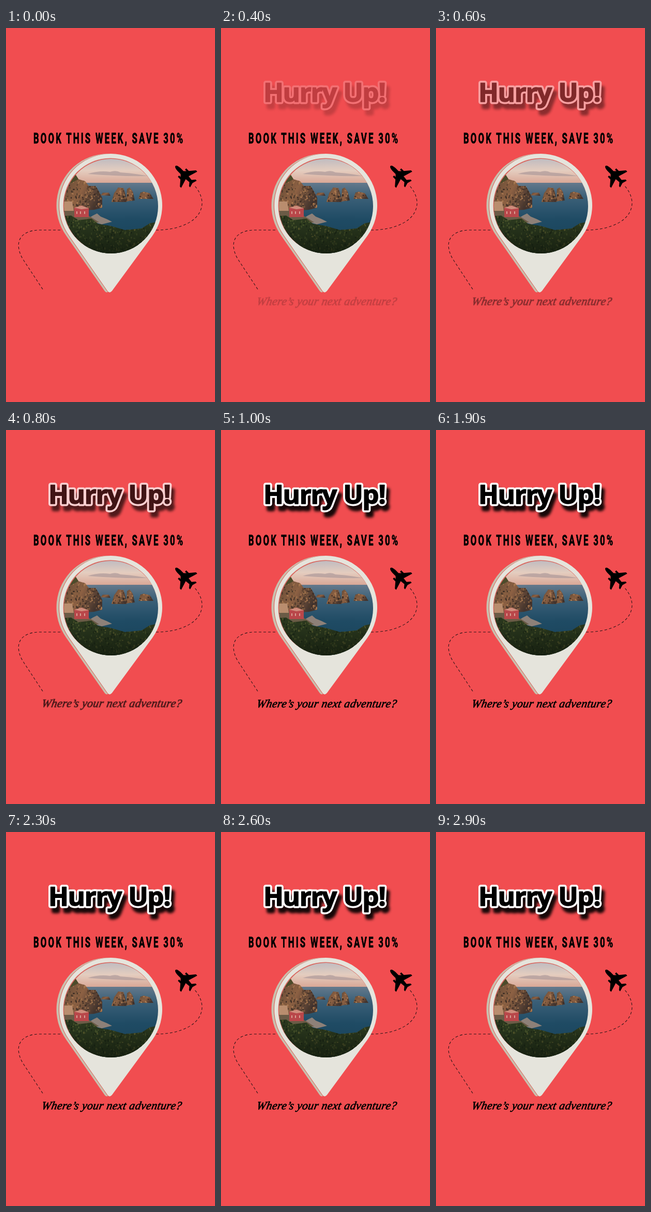
Recreate the animation shown at these times as an HTML page. Size 404 by 720 pixels, loop 3000 ms.

```html
<!DOCTYPE html>
<html lang="en">
<head>
<meta charset="utf-8">
<title>Book this week</title>
<style>
  html, body { margin: 0; width: 100%; height: 100%; overflow: hidden; background: #f14d50; }
  svg { display: block; width: 100vw; height: 100vh; }
  .shout { font: 700 51px "Open Sans", "Noto Sans", sans-serif; letter-spacing: -1.4px; word-spacing: 1.5px;
    stroke-linejoin: round; filter: drop-shadow(6px 10px 2.5px rgba(0, 0, 0, .9)); }
  .offer { font: 700 28px Roboto, sans-serif; letter-spacing: 5.2px; word-spacing: -1px;
    stroke: #000; stroke-width: .8px; }
  .script { font: italic 22px "Liberation Serif", serif; letter-spacing: .35px;
    stroke: #000; stroke-width: .7px; }
  .route { fill: none; stroke: #2a1518; stroke-width: 1.1px; stroke-dasharray: 5 4; }
</style>
</head>
<body>
<svg viewBox="0 0 404 720">
  <defs>
    <linearGradient id="sky" x2="0" y2="1">
      <stop stop-color="#bdbac0"/>
      <stop offset=".5" stop-color="#e4cdbf"/>
      <stop offset="1" stop-color="#d9a695"/>
    </linearGradient>
    <linearGradient id="sea" x2="0" y2="1">
      <stop stop-color="#64798c"/>
      <stop offset=".2" stop-color="#3b6078"/>
      <stop offset=".5" stop-color="#1f4b64"/>
      <stop offset="1" stop-color="#173f55"/>
    </linearGradient>
    <linearGradient id="rock" x2="1" y2=".5">
      <stop stop-color="#5d4532"/>
      <stop offset=".55" stop-color="#8d6143"/>
      <stop offset="1" stop-color="#43342e"/>
    </linearGradient>
    <linearGradient id="shade" x2="0" y2="1">
      <stop stop-color="#10180c" stop-opacity="0"/>
      <stop offset="1" stop-color="#10180c" stop-opacity=".8"/>
    </linearGradient>
    <clipPath id="lens"><circle cx="203" cy="343" r="91"/></clipPath>
    <path id="pin" d="M196 506L122 400A99.5 99.5 0 1 1 283 400L205 506Q200 512 196 506Z"/>
    <g id="rocks">
      <path d="M110 282L133 280L140 291L153 295L160 304L173 304L180 315L186 327V346L170 350L110 354Z"/>
      <path d="M183 322L187 317L199 317L202 323Z"/>
      <path d="M204 335L209 318L217 307L227 308L231 320L233 335Z"/>
      <path d="M232 334L234 310L239 307L245 315L249 332Z"/>
      <path d="M256 329L260 317L266 315L278 318L285 329Z"/>
    </g>
    <path id="hill" d="M110 362L126 361L140 370L165 367L178 377L202 381L230 389L262 386L278 376L298 372V438H110Z"/>
    <clipPath id="inRocks">
      <path d="M110 282L133 280L140 291L153 295L160 304L173 304L180 315L186 327V346L110 354Z"/>
      <path d="M204 335L209 318L217 307L227 308L233 320L239 307L245 315L249 332Z"/>
      <path d="M256 329L260 317L266 315L278 318L285 329Z"/>
    </clipPath>
    <clipPath id="inHill"><use href="#hill"/></clipPath>
  </defs>

  <rect width="404" height="720" fill="#f14d50"/>
  <path class="route" d="M71 503L32 444C14 412 28 389 66 389H105"/>
  <path class="route" d="M290 389C335 389 379 372 379 336C378 322 372 312 364 303"/>

  <use href="#pin" x="-5.5" fill="#c9c0ae"/>
  <use href="#pin" x="-1" fill="#d9564f"/>
  <use href="#pin" fill="#e5e4dc"/>
  <circle cx="202" cy="342" r="91.5" fill="#d9675f"/>

  <g clip-path="url(#lens)">
    <rect x="110" y="250" width="188" height="49" fill="url(#sky)"/>
    <path d="M158 281Q180 274 201 277Q213 273 221 278Q250 280 275 285Q220 286 158 281Z" fill="#a99798" opacity=".65"/>
    <rect x="110" y="298" width="188" height="140" fill="url(#sea)"/>
    <use href="#rocks" fill="url(#rock)"/>
    <g id="crags" clip-path="url(#inRocks)"></g>
    <path d="M110 282L133 280L140 291L129 297L110 304Z" fill="#4c4b2a"/>
    <path d="M155 369L168 361L176 357L183 363L195 368L205 373L185 378Z" fill="#8d8078"/>
    <path d="M110 352L131 349L161 362L180 374L110 380Z" fill="#6b5b46"/>
    <path d="M112 334H128L131 352H112Z" fill="#b98d6e"/>
    <path d="M132 346L146 342L160 347V364H132Z" fill="#b9474a"/>
    <path d="M132 346L146 342L160 347L146 349Z" fill="#cf8d7c"/>
    <path d="M137 353v5M144 353v5M152 353v5" stroke="#e3bfae" stroke-width="1.5"/>
    <use href="#hill" fill="#29361d"/>
    <g id="bushes" clip-path="url(#inHill)"></g>
    <rect x="110" y="375" width="188" height="62" fill="url(#shade)" clip-path="url(#inHill)"/>
  </g>

  <path transform="translate(346 284) rotate(-45)" d="M0-26C2.5-26 4-21 4-16V-8L8-4V-8H11.5V-1L22 8V11.5L4 6L3 15L9 20V23L0 20.5L-9 23V20L-3 15L-4 6L-22 11.5V8L-11.5-1V-8H-8V-4L-4-8V-16C-4-21-2.5-26 0-26Z"/>

  <text class="offer" transform="translate(53 222) scale(.6 1)">BOOK THIS WEEK, SAVE 30%</text>
  <g id="reveal">
    <g class="shout">
      <text id="shout" x="82" y="142" stroke="#fff" stroke-width="9">Hurry Up!</text>
      <use href="#shout" id="face"/>
    </g>
    <text class="script" transform="translate(68 534) skewX(-10)">Where’s your next adventure?</text>
  </g>
</svg>
<script>
  const LOOP = 3000, STEP = 100, FADE_START = 250, FADE_LENGTH = 750;
  const reveal = document.getElementById('reveal');

  // The black lettering is a slightly thickened copy above its white outline.
  const outline = document.getElementById('shout');
  const face = outline.cloneNode(true);
  face.removeAttribute('id');
  face.setAttribute('aria-hidden', 'true');
  face.setAttribute('stroke', '#000');
  face.setAttribute('stroke-width', 1.5);
  document.getElementById('face').replaceWith(face);

  // Seeded flecks give rock and shrubs their mottled look.
  let seed = 7;
  const random = () => (seed = seed * 16807 % 2147483647) / 2147483647;
  function speckle(id, count, [x, y, width, height], colours) {
    let flecks = '';
    for (let i = 0; i < count; i++) {
      const cx = (x + random() * width).toFixed(1), cy = (y + random() * height).toFixed(1);
      const rx = (.6 + random() * 1.4).toFixed(1), ry = (.8 + random() * 2).toFixed(1);
      const fill = colours[Math.floor(random() * colours.length)];
      flecks += `<ellipse cx="${cx}" cy="${cy}" rx="${rx}" ry="${ry}" fill="${fill}"/>`;
    }
    document.getElementById(id).innerHTML = flecks;
  }
  speckle('crags', 700, [110, 280, 176, 74], ['#3a2b24', '#4d3a2c', '#a87850', '#7d5a3e']);
  speckle('bushes', 600, [110, 360, 188, 76], ['#1c2716', '#2f3d1e', '#46522a', '#5b5c2f']);

  function draw() {
    const time = Math.floor(performance.now() % LOOP / STEP) * STEP;
    reveal.style.opacity = Math.min(1, Math.max(0, (time - FADE_START) / FADE_LENGTH));
    requestAnimationFrame(draw);
  }
  draw();
</script>
</body>
</html>
```
